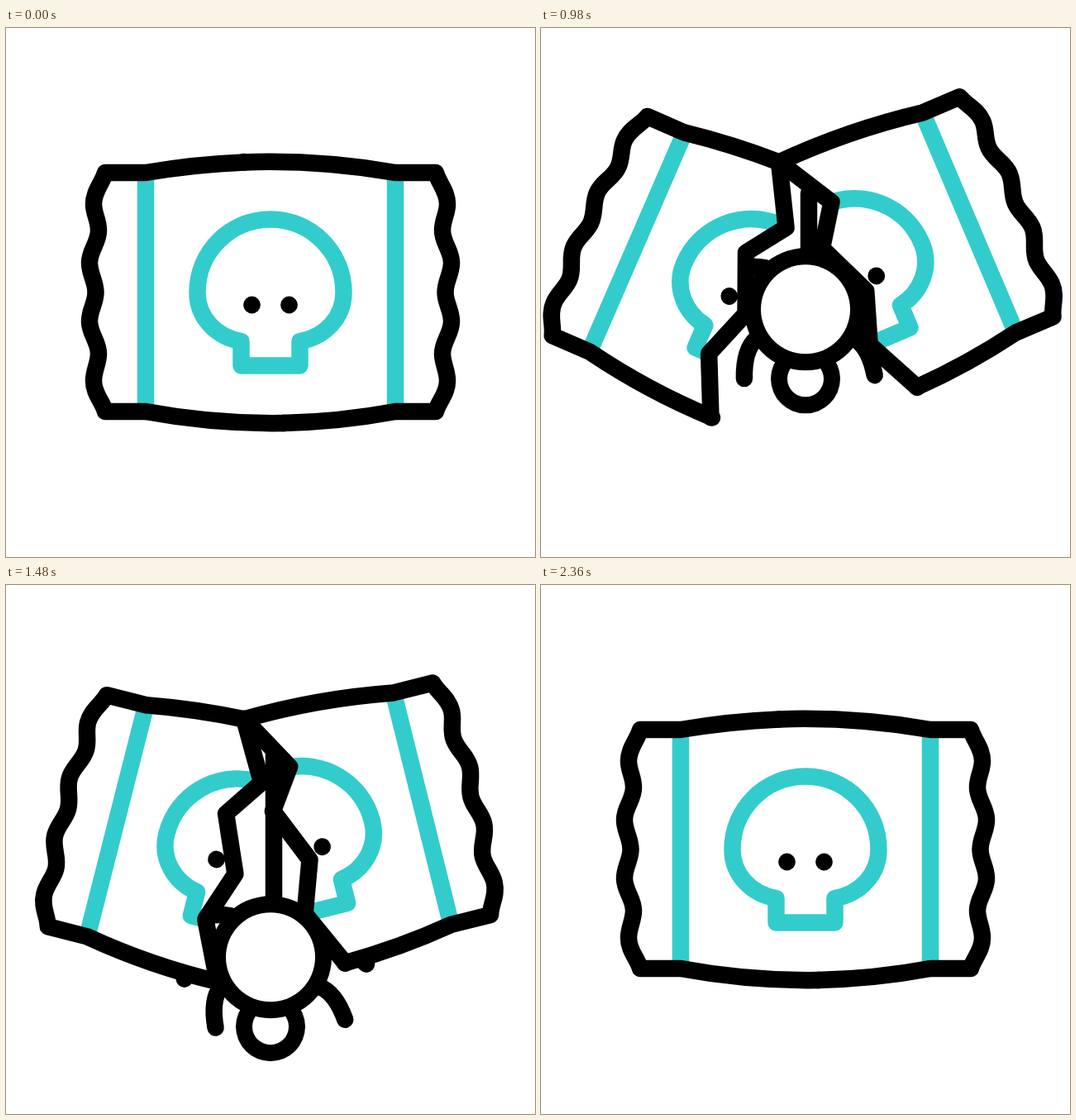
An HTML page with a canvas that plays this animation: 640 by 640 pixels, repeating every 2.4 s.

```html
<!DOCTYPE html>
<html lang="en">
<head>
<meta charset="utf-8">
<title>Torn bag</title>
<style>
html, body { margin: 0; height: 100%; overflow: hidden; background: #fff; }
canvas { display: block; width: 100vw; height: 100vh; }
</style>
</head>
<body>
<canvas id="stage" width="640" height="640"></canvas>
<script>
const LOOP = 2400, TEAL = '#33cccc', BLACK = '#000', WHITE = '#fff';
const ctx = document.getElementById('stage').getContext('2d');
const PIVOT = [288, 162];

// Keyframes: [time, value], smooth steps between them
const OPEN = [[560, 0], [1000, 23.6], [1260, 23.1], [1785, 0]];
const DROP = [[620, 163], [1280, 474], [1420, 474], [1780, 163]];
const CRACK_HEAD = [[0, 0], [560, 1]];
const CRACK_TAIL = [[1785, 0], [2360, 1]];
const SWAY = [[1160, 6], [1480, 15]];

function at(keys, t) {
  if (t <= keys[0][0]) return keys[0][1];
  for (let i = 1; i < keys.length; i++) {
    const [t0, a] = keys[i - 1], [t1, b] = keys[i];
    if (t < t1) {
      const u = (t - t0) / (t1 - t0);
      return a + (b - a) * u * u * (3 - 2 * u);
    }
  }
  return keys[keys.length - 1][1];
}

const crackPts = [[288, 162], [327.5, 231.5], [295, 278.5], [324, 346.5], [302.5, 408.5], [335.5, 478.5]];
const crackLen = crackPts.slice(1).reduce(
  (sum, p, i) => sum + Math.hypot(p[0] - crackPts[i][0], p[1] - crackPts[i][1]), 0);
const crackBody = crackPts.map(p => 'L' + p).join('');
const crack = new Path2D('M' + crackBody.slice(1));

// Wavy edge, top to bottom; the right one is mirrored
const waveNums = [
  117, 187, 106, 197, 106, 213, 106, 225, 112, 232, 112, 245,
  112, 260, 101, 269, 101, 284, 101, 298, 108.5, 306, 108.5, 320,
  108.5, 333, 101, 341, 101, 355, 101, 370, 112, 379, 112, 394,
  112, 406, 106, 414, 106, 427, 106, 443, 117, 452, 120, 464
];
const wave = flip => 'C' + waveNums.map((n, i) => flip && i % 2 === 0 ? 640 - n : n).join(' ');

const halves = [
  {
    dir: 1,
    edge: `M288 162.4Q228.5 164.8 169 175H120${wave(false)}H169Q252.5 479.5 337 478`
  },
  {
    dir: -0.98,
    edge: `M288 162.4Q379.5 159.2 471 175H520${wave(true)}H471Q403.5 476.5 335 478`
  }
].map(h => ({
  dir: h.dir,
  line: new Path2D(h.edge),
  shape: new Path2D(h.edge + [...crackPts].reverse().map(p => 'L' + p).join('') + 'Z')
}));

const print = new Path2D(
  'M169 175V464M471 175V464' +
  'M284.5 379C254 374 231.5 350 231.5 320C231.5 271 271 231.5 320 231.5' +
  'S408.5 271 408.5 320C408.5 350 386 374 355.5 379V408.5H284.5Z');

// Right-hand legs around the body centre: root and curve
const legs = [
  { root: [48, -50], curve: 'Q82 -61 112 -42', swing: () => 8 },
  { root: [66, -12], curve: 'Q94 -7 111 18', swing: () => 11.5 },
  { root: [60, 36], curve: 'Q76 48 79 82', swing: t => at(SWAY, t) }
].map(l => ({ ...l, path: new Path2D('M' + l.root + l.curve) }));

function stroke(path, color) {
  ctx.strokeStyle = color;
  ctx.stroke(path);
}

function disc(x, y, r, color) {
  ctx.beginPath();
  ctx.arc(x, y, r, 0, Math.PI * 2);
  ctx.fillStyle = color;
  ctx.fill();
}

function ring(x, y, r) {
  disc(x, y, r + 10, BLACK);
  disc(x, y, r - 10, WHITE);
}

function drawArt() {
  stroke(print, TEAL);
  disc(297.5, 335, 10.4, BLACK);
  disc(342.5, 335, 10.4, BLACK);
}

function drawCrack(from, to) {
  if (to <= from) return;
  ctx.save();
  ctx.setLineDash([(to - from) * crackLen, 2 * crackLen]);
  ctx.lineDashOffset = -from * crackLen;
  stroke(crack, BLACK);
  ctx.restore();
}

function drawHalf(half, angle) {
  ctx.save();
  ctx.translate(...PIVOT);
  ctx.rotate(half.dir * angle * Math.PI / 180);
  ctx.translate(-PIVOT[0], -PIVOT[1]);
  ctx.fillStyle = WHITE;
  ctx.fill(half.shape);
  ctx.save();
  ctx.clip(half.shape);
  drawArt();
  ctx.restore();
  stroke(half.line, BLACK);
  stroke(crack, BLACK);
  ctx.restore();
}

function drawLegs(side, t) {
  for (const { root, path, swing } of legs) {
    ctx.save();
    ctx.scale(side, 1);
    ctx.translate(...root);
    ctx.rotate(-side * swing(t) * Math.PI / 180);
    ctx.translate(-root[0], -root[1]);
    stroke(path, BLACK);
    ctx.restore();
  }
}

function drawSpider(t) {
  const y = at(DROP, t);
  ctx.save();
  ctx.beginPath();
  ctx.rect(0, 165, 640, 475);
  ctx.clip();
  if (y > 200) stroke(new Path2D(`M324 200V${y - 60}`), BLACK);
  ctx.translate(320, y);
  drawLegs(1, t);
  drawLegs(-1, t);
  ring(0, 84, 32);
  ring(0, 0, 64);
  ctx.restore();
}

function draw(t) {
  ctx.fillStyle = WHITE;
  ctx.fillRect(0, 0, 640, 640);
  ctx.lineWidth = 20.5;
  ctx.lineCap = ctx.lineJoin = 'round';
  const angle = at(OPEN, t);
  if (angle > 0) {
    drawSpider(t);
    halves.forEach(h => drawHalf(h, angle));
  } else {
    drawArt();
    halves.forEach(h => stroke(h.line, BLACK));
    drawCrack(at(CRACK_TAIL, t), at(CRACK_HEAD, t));
  }
}

const start = performance.now();
function tick() {
  draw((performance.now() - start) % LOOP);
  requestAnimationFrame(tick);
}
tick();
</script>
</body>
</html>
```
